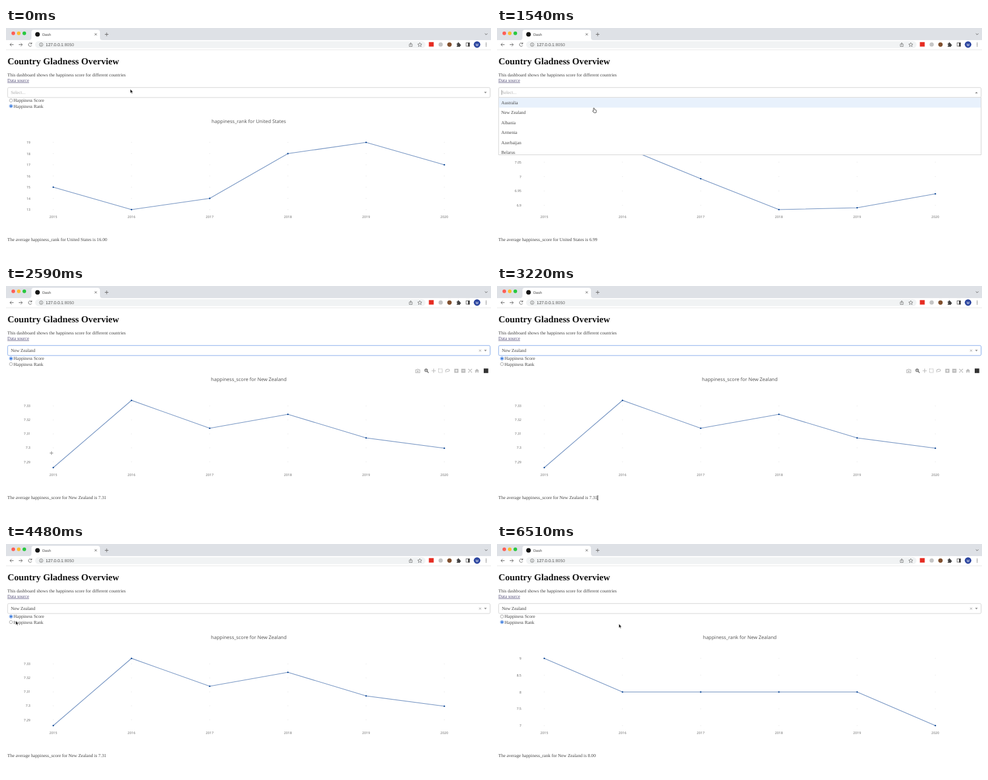
Write an HTML page that moves like this. It is 800 px wide and 380 px high and loops after 6580 ms.

```html
<!DOCTYPE html>
<html lang="en">
<head>
<meta charset="utf-8">
<title>Dash</title>
<style>
html, body { margin: 0; width: 100%; height: 100%; overflow: hidden; background: #fff; }
svg { display: block; width: 800px; height: 380px; }
text { font: 7.54px "Liberation Serif", Times, serif; fill: #444; text-rendering: geometricPrecision; white-space: pre; }
text.h1 { font-size: 15.2px; font-weight: bold; fill: #111; }
text.ui { font: 7px "Liberation Sans", Arial, sans-serif; }
text.tick { font: 5.6px "Open Sans", sans-serif; fill: #666; }
text.title { font: 7.97px "Open Sans", sans-serif; fill: #505050; }
.icon { fill: none; stroke: #666; stroke-width: .9; }
.bar { fill: none; stroke: #bbb; stroke-width: 1.1; }
</style>
</head>
<body>
<svg viewBox="0 0 800 380">
  <g id="browser">
    <path d="M0 0H800V20H0z" fill="#dee1e6"/>
    <path d="M38 20q4 0 4-4V7q0-4 4-4H151q4 0 4 4v9q0 4 4 4z" fill="#fff"/>
    <circle cx="12" cy="8.8" r="3" fill="#fe5f57"/>
    <circle cx="21" cy="8.8" r="3" fill="#febc2e"/>
    <circle cx="30.2" cy="8.8" r="3" fill="#28c840"/>
    <circle cx="52" cy="10.5" r="3.8" fill="#151515"/>
    <text class="ui" x="60" y="12.8" style="font-size:6px">Dash</text>
    <path class="icon" d="M146.2 8.7l3.6 3.6m0-3.6l-3.6 3.6M163 10.5h6m-3-3v6M789.8 9l2.2 2.2 2.2-2.2"/>
    <rect x="48" y="21.7" width="644" height="11.6" rx="5.8" fill="#f1f3f4"/>
    <path class="icon" d="M12.5 27.5H6.5m2.7-2.7l-2.7 2.7 2.7 2.7M21 27.5h6m-2.7-2.7l2.7 2.7-2.7 2.7M42 25.7a2.8 2.8 0 1 0 .4 3M42.5 24v2.2h-2.3"/>
    <circle class="icon" cx="58" cy="27.5" r="2.9" style="stroke-width:.7"/>
    <path class="icon" d="M58 27v2.2m0-3.7v.7"/>
    <text class="ui" x="65.5" y="30">127.0.0.1<tspan fill="#666">:8050</tspan></text>
    <path class="icon" d="M666.5 26.5h-1.3v4h4.8v-4h-1.3M667.6 29v-4.5m-1.4 1.4l1.4-1.4 1.4 1.4M682.5 24.1l1 2.3 2.5.2-1.9 1.6.6 2.4-2.2-1.3-2.2 1.3.6-2.4-1.9-1.6 2.5-.2z" style="stroke-width:.7"/>
    <rect x="697.5" y="23.3" width="8" height="7.4" fill="#e62c22"/>
    <circle cx="717" cy="27.3" r="3.5" fill="#c5c5c5"/>
    <circle cx="731.5" cy="27.3" r="3.6" fill="#80502f"/>
    <path d="M743.5 25.5h1.6a1.2 1.2 0 1 1 2.2 0h1.7v1.8a1.1 1.1 0 1 1 0 2.1v1.6h-5.5v-1.5a1 1 0 1 0 0-2z" fill="#444"/>
    <rect class="icon" x="759" y="24.5" width="5.5" height="5.5"/>
    <path d="M762 24h3v6.5h-3z" fill="#444"/>
    <circle cx="777" cy="27.3" r="5.4" fill="#2b459f"/>
    <text class="ui" x="777" y="29.6" text-anchor="middle" style="fill:#fff;font-size:6px">M</text>
    <path d="M792 24.6v6" stroke="#444" stroke-width="1.2" stroke-dasharray="1.2 1.2"/>
    <path d="M0 36H800" stroke="#e4e4e4" stroke-width=".8"/>
  </g>
  <text class="h1" x="2.5" y="59.5">Country Gladness Overview</text>
  <text x="2.3" y="80.3">This dashboard shows the happiness score for different countries</text>
  <text x="2.3" y="88.8" text-decoration="underline" style="fill:#56507a">Data source</text>
  <g id="page"></g>
</svg>
<script>
const LOOP = 6580, STEP = 70;
const page = document.getElementById('page');

// y: point heights; ticks: labels from the lowest up, at bottom - i * gap
const charts = {
  usRank:  { kind: 'rank', land: 'United States', mean: '16.00', y: [263, 300, 281.5, 207.5, 189, 226],
             ticks: [13, 14, 15, 16, 17, 18, 19], bottom: 300, gap: 18.5 },
  usScore: { kind: 'score', land: 'United States', mean: '6.99', y: [189, 196, 249, 300, 297, 274],
             ticks: [6.9, 6.95, 7, 7.05, 7.1], bottom: 293, gap: 23.75 },
  nzScore: { kind: 'score', land: 'New Zealand', mean: '7.31', y: [300, 189, 235, 212, 251, 268],
             ticks: [7.29, 7.3, 7.31, 7.32, 7.33], bottom: 290.5, gap: 23.1 },
  nzRank:  { kind: 'rank', land: 'New Zealand', mean: '8.00', y: [189, 244.5, 244.5, 244.5, 244.5, 300],
             ticks: [7, 7.5, 8, 8.5, 9], bottom: 300, gap: 27.75 }
};
const countries = ['Australia', 'New Zealand', 'Albania', 'Armenia', 'Azerbaijan', 'Belarus'];

// pointer stops: time, x, y
const stops = [
  [0, 205, 101], [210, 8, 119], [280, 8, 119], [490, 220, 101], [1190, 220, 101],
  [1400, 159, 132], [1540, 159, 132], [1680, 110, 140], [1820, 90, 140], [2240, 75, 276],
  [2800, 75, 276], [3150, 166, 350], [3290, 166, 350], [3500, 147.5, 350], [3780, 11, 128],
  [4340, 11, 128], [4480, 16, 127], [5740, 16, 127], [6090, 201, 132], [LOOP, 201, 132]
];

const text = (x, y, s, attrs = '') => `<text x="${x}" y="${y}" ${attrs}>${s}</text>`;
const path = (d, attrs) => `<path d="${d}" ${attrs}/>`;
const rect = (x, y, w, h, attrs) => `<rect x="${x}" y="${y}" width="${w}" height="${h}" ${attrs}/>`;
const circle = (x, y, r, attrs) => `<circle cx="${x}" cy="${y}" r="${r}" ${attrs}/>`;

function pointerAt(t) {
  const i = stops.findIndex(s => s[0] > t);
  const [t0, x0, y0] = stops[i - 1], [t1, x1, y1] = stops[i];
  const p = (t - t0) / (t1 - t0), e = p * p * (3 - 2 * p);
  return [x0 + (x1 - x0) * e, y0 + (y1 - y0) * e];
}

function radio(y, label, on) {
  return circle(8.2, y, 2.6, `fill="#fff" stroke="${on ? '#2a6fdb' : '#909090'}" stroke-width=".7"`) +
    (on ? circle(8.2, y, 1.6, 'fill="#1763d6"') : '') + text(12.4, y + 2.5, label);
}

function select(value, open, focus) {
  const arrow = open ? 'M788.6 108l2.2-2.4 2.2 2.4z' : 'M788.6 105.6l2.2 2.4 2.2-2.4z';
  return rect(2.7, 98.3, 795.8, 16.6, `rx="2" fill="#fff" stroke="${focus ? '#7ea6ea' : '#d2d2d2'}" stroke-width=".9"`) +
    text(8, 109, value || 'Select...', value ? '' : 'style="fill:#aaa"') +
    (value ? path('M780.3 105l3.4 3.4m0-3.4l-3.4 3.4', 'stroke="#999" stroke-width=".8"') : '') +
    (open ? path('M7.8 102.5v8', 'stroke="#555" stroke-width=".6"') : '') +
    path(arrow, 'fill="#888"');
}

function menu(active) {
  return rect(2.7, 114.9, 795.8, 94.6, 'fill="#fff" stroke="#d2d2d2" stroke-width=".9"') +
    rect(3.1, 115.3 + active * 16.4, 795, 16.2, 'fill="#e8f1fc"') +
    '<svg x="0" y="115" width="800" height="94" viewBox="0 115 800 94" style="width:800px;height:94px">' +
    countries.map((c, i) => text(7, 126 + i * 16.4, c)).join('') + '</svg>';
}

function chart({ kind, land, y, ticks, bottom, gap }) {
  const xs = y.map((_, i) => 78 + i * 129);
  let out = text(400.5, 157.3, `happiness_${kind} for ${land}`, 'class="title" text-anchor="middle"');
  ticks.forEach((label, i) => {
    const ty = bottom - i * gap;
    out += text(40.3, ty + 2, label, 'class="tick" text-anchor="end"');
    out += path(xs.map(x => `M${x - .6} ${ty}h1.2`).join(''), 'stroke="#ddd" stroke-width=".8"');
  });
  xs.forEach((x, i) => out += text(x, 314, 2015 + i, 'class="tick" text-anchor="middle"'));
  out += path('M' + xs.map((x, i) => x + ' ' + y[i]).join('L'), 'fill="none" stroke="#7191c0" stroke-width="1.1"');
  return out + xs.map((x, i) => circle(x, y[i], 1.35, 'fill="#1b529c"')).join('');
}

function modebar() {
  return path('M675.8 138.5h1.8l.7-1h1.8l.7 1h1.8v4.6h-6.8zM705.5 136.5v7m-3.5-3.5h7M762.5 137l6 6m0-6l-6 6', 'class="bar"') +
    circle(679.2, 140.7, 1, 'class="bar"') +
    circle(693, 139.3, 2.2, 'class="bar" style="stroke:#666"') +
    path('M694.7 141l2.4 2.5M692 139.3h2', 'class="bar" style="stroke:#666"') +
    rect(713.5, 137, 6, 6, 'class="bar" stroke-dasharray="1.5 .8"') +
    path('M726 142.8q-2.4-4 1.5-5.2 4-.6 4 1.4 0 2.6-4.6 2.2', 'class="bar"') +
    rect(739.5, 136.8, 6.8, 6.6, 'fill="#bbb"') + rect(751, 136.8, 6.8, 6.6, 'fill="#bbb"') +
    path('M741 140.1h3.8m-1.9-1.9v3.8M752.5 140.1h3.8', 'stroke="#fff"') +
    path('M773 140.3l3.8-3.6 3.8 3.6h-1.2v3h-1.8v-2h-1.6v2h-1.8v-3z', 'fill="#bbb"') +
    rect(788, 136.3, 7.5, 7.5, 'fill="#333"');
}

function pointer(x, y, shape) {
  const shapes = {
    arrow: path('M0 0V6.6L1.6 5.2 2.6 7.5 3.7 7 2.7 4.8H4.7z', 'fill="#111" stroke="#fff" stroke-width=".5"'),
    hand: path('M0 .5q1-1 1.6.2L2 3l2.4.5q.8.3.6 1.4L4.3 8H1L-1.4 5.2q.1-1 1.5 0z', 'fill="#fff" stroke="#333" stroke-width=".8"'),
    cross: path('M-3 0h6M0-3v6', 'stroke="#777" stroke-width=".8"'),
    beam: path('M-1.3-3.5Q0-3.5 0-2.8V2.8Q0 3.5-1.3 3.5M1.3-3.5Q0-3.5 0-2.8V2.8Q0 3.5 1.3 3.5', 'fill="none" stroke="#333" stroke-width=".7"')
  };
  return `<g transform="translate(${x} ${y})">${shapes[shape]}</g>`;
}

function draw(t) {
  const [x, y] = pointerAt(t);
  const data = charts[t < 280 ? 'usRank' : t < 1820 ? 'usScore' : t < 5740 ? 'nzScore' : 'nzRank'];
  const open = t >= 1260 && t < 1820;
  const picked = t >= 1820;
  const selecting = t >= 3360 && t < 4340;
  const start = t < 3500 ? x : 147.5;
  const shape = open && y > 115 ? 'hand' : y > 343 ? 'beam' : y > 165 ? 'cross' : 'arrow';

  page.innerHTML =
    radio(119.8, 'Happiness Score', data.kind === 'score') +
    radio(129, 'Happiness Rank', data.kind === 'rank') +
    chart(data) +
    (t >= 1960 && t < 4060 ? modebar() : '') +
    (selecting ? rect(start, 345.3, 166.3 - start, 8.7, 'fill="#b3d5fb"') : '') +
    text(2.3, 352.2, `The average happiness_${data.kind} for ${data.land} is ${data.mean}`) +
    select(picked && 'New Zealand', open, t >= 1260 && t < 3290 && !open) +
    (open ? menu(t >= 1610 ? 1 : 0) : '') +
    pointer(x, y, shape);
}

let last = -1;
function tick() {
  const t = Math.floor(performance.now() % LOOP / STEP) * STEP;
  if (t !== last) draw(last = t);
  requestAnimationFrame(tick);
}
tick();
</script>
</body>
</html>
```
